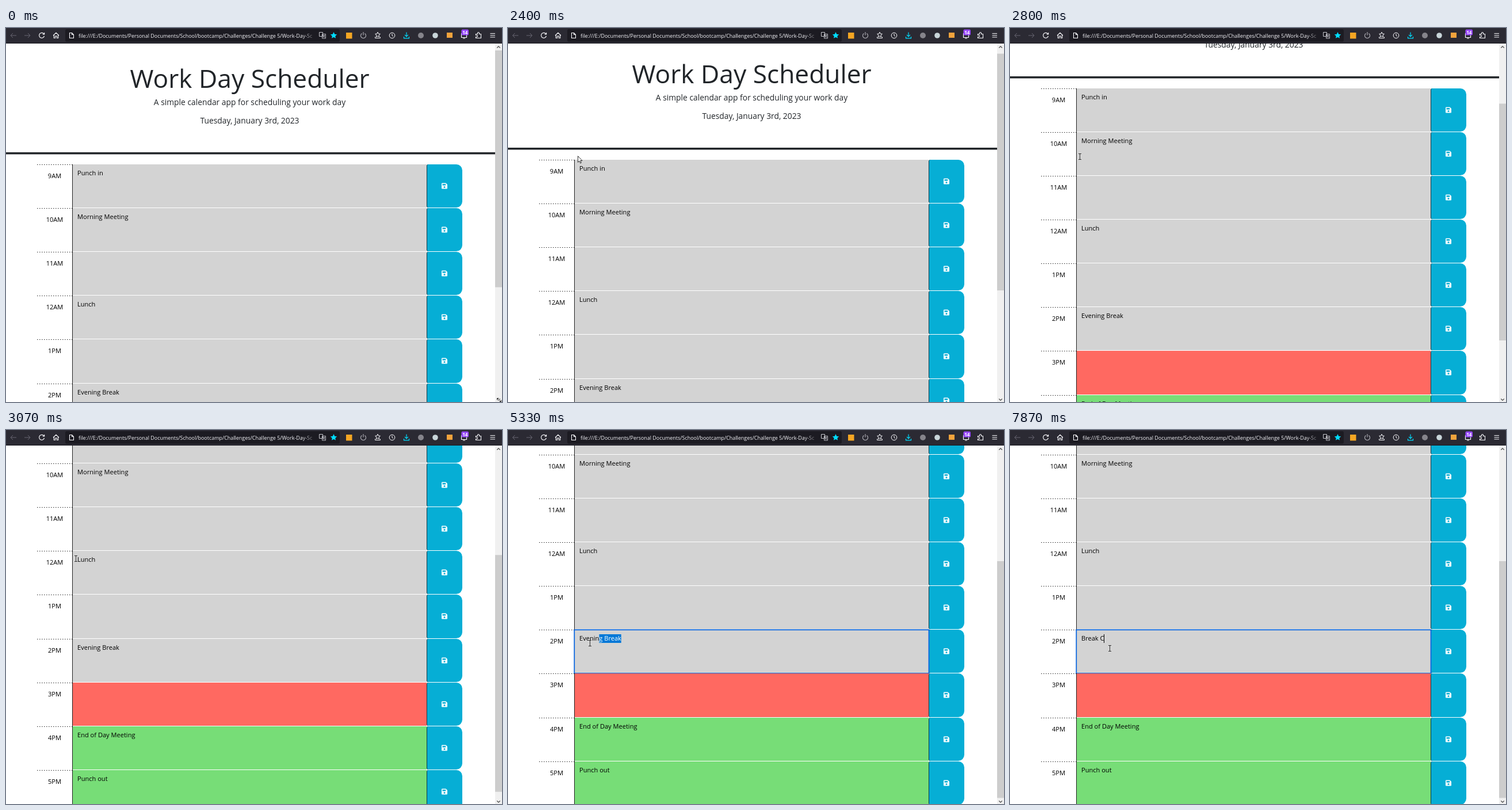
Recreate the animation shown at these times as an HTML page with a canvas. Size 862 by 650 pixels, loop 8 s.

```html
<!DOCTYPE html>
<html lang="en">
<head>
<meta charset="utf-8">
<title>Work Day Scheduler</title>
<style>
html, body { margin: 0; width: 100%; height: 100%; overflow: hidden; background: #fff; }
canvas { display: block; }
</style>
</head>
<body>
<canvas id="stage" width="862" height="650"></canvas>
<script>
const ctx = document.getElementById('stage').getContext('2d');
const LOOP = 8000, STEPS_PER_MS = 0.015;
const ZOOM = 0.692, CENTER = 423.5, ROW_HEIGHT = 110 * ZOOM;
const SANS = '"Open Sans", "Noto Sans", sans-serif';
const font = size => size * ZOOM + 'px ' + SANS;
const BODY = font(16), LEAD = font(20), TITLE = font(64);
const GRAY = '#d3d3d3', RED = '#ff6961', GREEN = '#77dd77', BLUE = '#06aed5', ICON = '#fbfbfe';
const FOCUS_ROW = 5;
const ROWS = [
  ['9AM', 'Punch in', GRAY], ['10AM', 'Morning Meeting', GRAY], ['11AM', '', GRAY],
  ['12AM', 'Lunch', GRAY], ['1PM', '', GRAY], ['2PM', 'Evening Break', GRAY],
  ['3PM', '', RED], ['4PM', 'End of Day Meeting', GREEN], ['5PM', 'Punch out', GREEN]
];

// Keyframes: step, value(s)
const SCROLL = [[35, 0], [36, 8], [38, 33], [40, 74], [42, 132.3], [44, 196], [46, 255], [47, 266], [48, 270.3]];
const POINTER = [
  [4, 857, 646], [8, 790, 588], [13, 450, 286], [17, 324, 174], [18, 321, 146],
  [20, 321, 146], [21, 290, 160], [23, 145, 213], [24, 121, 222],
  [51, 121, 222], [56, 114, 231],
  [59, 114, 231], [62, 170, 290], [65, 262, 368], [67, 283, 388],
  [75, 283, 388], [76, 262, 382], [78, 190, 372], [79, 158, 369], [80, 142, 368.5],
  [82, 93, 368], [83, 84, 368], [85, 100, 370], [88, 166, 377], [89, 173, 378]
];
const KEYS = [99, 102, 106, 109, 111, 114, 118];
const TYPED = 'Break C';

function at(keys, k) {
  if (k <= keys[0][0]) return keys[0].slice(1);
  for (let i = 1; i < keys.length; i++) {
    const a = keys[i - 1], b = keys[i];
    if (k <= b[0]) {
      const p = (k - a[0]) / (b[0] - a[0]);
      return a.slice(1).map((v, j) => v + (b[j + 1] - v) * p);
    }
  }
  return keys[keys.length - 1].slice(1);
}

function rect(x, y, w, h, color) {
  ctx.fillStyle = color;
  ctx.fillRect(x, y, w, h);
}

function box(x, y, w, h, r, color) {
  ctx.fillStyle = color;
  ctx.beginPath();
  ctx.roundRect(x, y, w, h, r);
  ctx.fill();
}

function disc(x, y, r, color) {
  ctx.fillStyle = color;
  ctx.beginPath();
  ctx.arc(x, y, r, 0, 7);
  ctx.fill();
}

function stroke(d, color, width = 1.1) {
  ctx.strokeStyle = color;
  ctx.lineWidth = width;
  ctx.stroke(new Path2D(d));
}

function text(s, x, y, face, color, align = 'left') {
  ctx.font = face;
  ctx.fillStyle = color;
  ctx.textAlign = align;
  ctx.fillText(s, x, y);
}

function star(x, y, r) {
  let d = '';
  for (let i = 0; i < 10; i++) {
    const a = -Math.PI / 2 + i * Math.PI / 5, q = i % 2 ? r * 0.48 : r;
    d += (i ? 'L' : 'M') + (x + q * Math.cos(a)) + ' ' + (y + q * Math.sin(a));
  }
  return d + 'Z';
}

function toolbar() {
  rect(0, 0, 862, 27, '#2b2a33');
  rect(0, 26, 862, 1, '#1a1920');
  box(103, 2, 477, 22, 3, '#1c1b22');
  stroke('M18 13H8M12 9L8 13L12 17M32 13H42M38 9L42 13L38 17', '#686772', 1);
  stroke('M66 10.5A4.5 4.5 0 1 0 66.5 14M66.6 8V11H63.5', ICON, 1.2);
  stroke('M82 13L87 8.3L92 13M83.3 12V17.5H85.6V14H88.4V17.5H90.7V12', ICON);
  stroke('M110.5 8.5H114.5L117.5 11.5V17.5H110.5ZM114.5 8.5V11.5H117.5', ICON);

  text('file:///E:/Documents/Personal Documents/School/bootcamp/Challenges/Challenge 5/Work-Day-Sc',
    126, 16.5, '8.95px ' + SANS, '#f4f4f8');
  const fade = ctx.createLinearGradient(515, 0, 541, 0);
  fade.addColorStop(0, '#1c1b2200');
  fade.addColorStop(1, '#1c1b22');
  rect(515, 4, 28, 18, fade);

  stroke('M544.5 7.5H550.5V14.5H544.5Z', '#c8c8ce', 1);
  stroke('M549.5 10.5H555.5V18H549.5ZM551 13H554.5M552.7 12V13M551 16.5L554 13M551.3 14L554.3 16.5', '#c8c8ce', 0.9);
  ctx.fillStyle = '#00ddff';
  ctx.fill(new Path2D(star(569.5, 13, 6)));

  rect(591, 8, 10.5, 10.5, '#f5a623');
  stroke('M618.5 9.5A4.5 4.5 0 1 0 623.5 9.5M621 7V12.5', '#b4b3ba');
  stroke(star(646, 11.8, 4.6), ICON, 1);
  stroke('M641.5 15.5V17.5H650.5V15.5', ICON, 1);
  ctx.strokeStyle = ICON;
  ctx.beginPath();
  ctx.arc(671, 13, 4.8, 0, 7);
  ctx.stroke();
  stroke('M671 10V13L673 14.5', ICON, 1);
  stroke('M696 7.5V14.5M693 11.8L696 14.8L699 11.8M691.5 15V17.8H700.5V15', '#00ddff', 1.2);
  disc(721, 13, 5, '#85848b');
  disc(746, 13, 4.8, '#c9d6da');
  rect(766, 8, 10, 9, '#f2a33c');
  stroke('M791.5 9.5H800.5V16.5H791.5ZM794 18H798', ICON, 1.2);
  box(791.5, 2.5, 12.5, 10, 2, '#9747ff');
  text('14', 797.8, 10.6, 'bold 8px ' + SANS, '#fff', 'center');
  stroke('M816.5 10.5H819.5V9A1.5 1.5 0 0 1 822.5 9V10.5H825.5V17.5H816.5V15.5H818A1.5 1.5 0 0 0 818 12.5H816.5Z', ICON);
  stroke('M841.5 9.5H850M841.5 12.7H850M841.5 15.9H850', ICON, 1);
}

function saveIcon(x, y) {
  ctx.fillStyle = '#fff';
  ctx.fill(new Path2D(`M${x - 4} ${y - 5}H${x + 2.4}L${x + 5} ${y - 2.4}V${y + 4}Q${x + 5} ${y + 5} ${x + 4} ${y + 5}H${x - 4}Q${x - 5} ${y + 5} ${x - 5} ${y + 4}V${y - 4}Q${x - 5} ${y - 5} ${x - 4} ${y - 5}Z`));
  rect(x - 3.5, y - 3.5, 5.7, 2.6, BLUE);
  disc(x, y + 2, 1.5, BLUE);
}

function focusedEntry(k, y, note) {
  const x = 124, base = y + 19;
  const count = KEYS.filter(key => k >= key).length;
  const shown = count ? TYPED.slice(0, count) : note;
  text(shown, x, base, BODY, '#000');
  const edge = n => x + ctx.measureText(shown.slice(0, n)).width;
  if (count) {
    rect(Math.round(edge(count)), y + 8, 1, 15, '#000');
  } else if (k >= 76) {
    // Selection follows the drag one step behind the pointer
    const dragX = at(POINTER, Math.min(k - 1, 83))[0];
    let n = 0;
    while (n < shown.length && (edge(n) + edge(n + 1)) / 2 < dragX) n++;
    const left = edge(n), width = edge(shown.length) - left;
    if (width > 0) {
      ctx.save();
      ctx.beginPath();
      ctx.rect(left, y + 8, width, 15);
      ctx.clip();
      rect(left, y + 8, width, 15, '#0078d7');
      text(shown, x, base, BODY, '#fff');
      ctx.restore();
    }
  }
}

function rowTop(i, scroll) {
  return Math.round(237 + ROW_HEIGHT * i - scroll);
}

function row(i, k, scroll) {
  const [hour, note, color] = ROWS[i];
  const y = rowTop(i, scroll), h = rowTop(i + 1, scroll) - y - 1;
  ctx.setLineDash([1.6, 2.4]);
  stroke(`M54 ${y + 0.5}H115`, '#000', 0.8);
  ctx.setLineDash([]);
  text(hour, 84.5, y + 24, BODY, '#000', 'center');
  rect(116, y, 615, h, color);
  rect(115, y, 1, h + 1, '#222');
  box(731, y, 20, h, [2.8, 0, 0, 2.8], '#063844');
  box(732, y, 61, h, [2.2, 10.4, 10.4, 2.2], BLUE);
  saveIcon(762, y + 37.5);
  if (i === FOCUS_ROW) {
    focusedEntry(k, y, note);
    if (k >= 76) {
      ctx.strokeStyle = '#0060df';
      ctx.lineWidth = 1.7;
      ctx.strokeRect(115.3, y + 0.3, 616.2, h + 0.6);
    }
  } else {
    text(note, 124, y + 19, BODY, '#000');
  }
}

function page(k, scroll) {
  const ink = '#212529', y = Math.round(-scroll);
  text('Work Day Scheduler', CENTER, 104 + y, TITLE, ink, 'center');
  text('A simple calendar app for scheduling your work day', CENTER, 134 + y, LEAD, ink, 'center');
  text('Tuesday, January 3rd, 2023', CENTER, 166 + y, LEAD, ink, 'center');
  rect(0, 216 + y, 850, 3.5, '#222529');
  ROWS.forEach((_, i) => row(i, k, scroll));
}

function scrollbar(scroll) {
  rect(850, 27, 12, 623, '#f0f0f0');
  rect(850, 39 + scroll * 0.699, 12, 411.5, '#cdcdcd');
  stroke('M853.3 34.5L856 31.8L858.7 34.5M853.3 644.5L856 647.2L858.7 644.5', '#505050', 1.3);
}

function pointer(k, scroll) {
  const [x, y] = at(POINTER, k);
  if (k < 5) {
    const d = 'M853.5 643.5L860.5 649.5M853.5 646.5V643.5H856.5M860.5 646.5V649.5H857.5';
    stroke(d, '#fff', 2);
    stroke(d, '#111', 0.9);
    return;
  }
  const dragging = k >= 76 && k < 86;
  const overEntry = x > 115 && x < 731 && y > rowTop(0, scroll);
  if (overEntry || dragging) {
    const cx = Math.round(x) + 0.5, cy = Math.round(y) + 1.5;
    stroke(`M${cx} ${cy - 5}V${cy + 5}M${cx - 2.5} ${cy - 5}H${cx + 2.5}M${cx - 2.5} ${cy + 5}H${cx + 2.5}`, '#333', 1);
    return;
  }
  ctx.save();
  ctx.translate(x, y);
  const arrow = new Path2D('M.5 .6V11.4L3 9.1L4.7 13L6.4 12.2L4.7 8.5H8Z');
  ctx.fillStyle = '#fff';
  ctx.fill(arrow);
  ctx.strokeStyle = '#000';
  ctx.lineWidth = 0.8;
  ctx.stroke(arrow);
  ctx.restore();
}

function draw(ms) {
  // The picture advances in fifteenths of a second
  const k = Math.floor((ms % LOOP + 4) * STEPS_PER_MS);
  const scroll = at(SCROLL, k)[0];
  rect(0, 0, 862, 650, '#fff');
  page(k, scroll);
  scrollbar(scroll);
  toolbar();
  pointer(k, scroll);
}

const start = performance.now();
function tick() {
  draw(performance.now() - start);
  requestAnimationFrame(tick);
}
tick();
</script>
</body>
</html>
```
